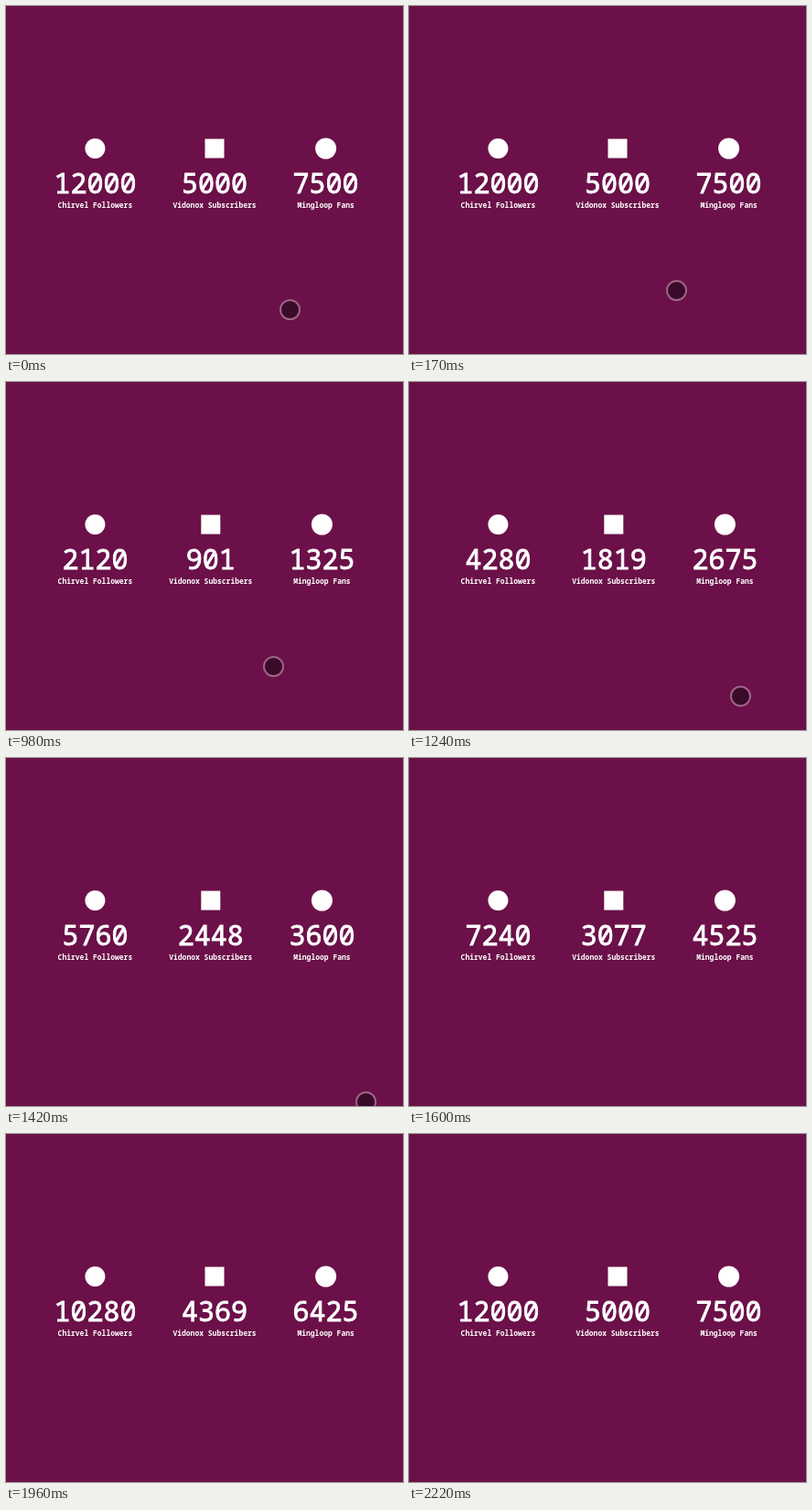
Animation, 434 px wide and 381 px high, one loop 2.85 s. Source, as an HTML page:

```html
<!DOCTYPE html>
<html lang="en">
<head>
<meta charset="utf-8">
<title>Follower counters</title>
<style>
  html, body { margin: 0; height: 100%; overflow: hidden; background: #6b1048; }
  svg { display: block; width: 434px; height: 381px; }
  text { fill: #fff; text-anchor: middle; font-family: "Noto Sans Mono", "DejaVu Sans Mono", monospace; }
  .count { font-size: 30px; stroke: #fff; stroke-width: 0.9; }
  .label { font-size: 8px; font-weight: 700; }
  .icon { fill: #fff; }
  #cursor { fill: #3a0a29; stroke: #9d6487; stroke-width: 2; }
</style>
</head>
<body>
<svg viewBox="0 0 434 381">
  <g><circle class="icon" cy="156" r="11"/><text class="count" y="205"></text><text class="label" y="221">Chirvel Followers</text></g>
  <g><rect class="icon" x="-10.5" y="145.5" width="21" height="21"/><text class="count" y="205"></text><text class="label" y="221">Vidonox Subscribers</text></g>
  <g><circle class="icon" cy="156" r="11.5"/><text class="count" y="205"></text><text class="label" y="221">Mingloop Fans</text></g>
  <circle id="cursor" r="10.5"/>
</svg>
<script>
const LOOP = 2850, TICK = 89;
const GAP = 40, CENTER = 219;
const DIGIT = 18, LETTER = 4.8; // monospace advances
const START = 8, LEAVE = 12;    // ticks: counting restarts, cursor moves away
const STEPS = 300;

const columns = [...document.querySelectorAll("g")].map((group, i) => {
  const [count, label] = group.querySelectorAll("text");
  const target = [12000, 5000, 7500][i];
  return {
    group, count, target,
    step: Math.ceil(target / STEPS),
    labelWidth: label.textContent.length * LETTER
  };
});
const cursor = document.getElementById("cursor");

// Counting picks up speed slightly as it goes
function stepsAt(tick) {
  if (tick < START) return STEPS;
  return Math.min(STEPS, Math.floor(2.2 + 16.28 * (tick - START) ** 1.043));
}

function drawColumns(steps) {
  for (const c of columns) {
    const text = String(Math.min(c.target, steps * c.step));
    c.count.textContent = text;
    c.width = Math.max(c.labelWidth, text.length * DIGIT);
  }
  let x = CENTER - columns.reduce((sum, c) => sum + c.width, GAP * 2) / 2;
  for (const c of columns) {
    c.group.setAttribute("transform", `translate(${x + c.width / 2} 0)`);
    x += c.width + GAP;
  }
}

// Settles on the spot within two ticks, later curves out through the bottom
function drawCursor(tick) {
  const arrive = Math.max(0, 1 - tick / 2);
  const leave = Math.max(0, tick - LEAVE);
  cursor.setAttribute("cx", 292.5 + 18 * arrive + 125.7 * (1 - Math.exp(-0.407 * leave)));
  cursor.setAttribute("cy", 311.5 + 21 * arrive + 16.25 * leave);
}

function frame() {
  const t = Math.floor(performance.now() % LOOP / 10) * 10;
  const tick = Math.min(25, Math.floor((t + 8) / TICK));
  drawColumns(stepsAt(tick));
  drawCursor(tick);
  requestAnimationFrame(frame);
}
frame();
</script>
</body>
</html>
```
